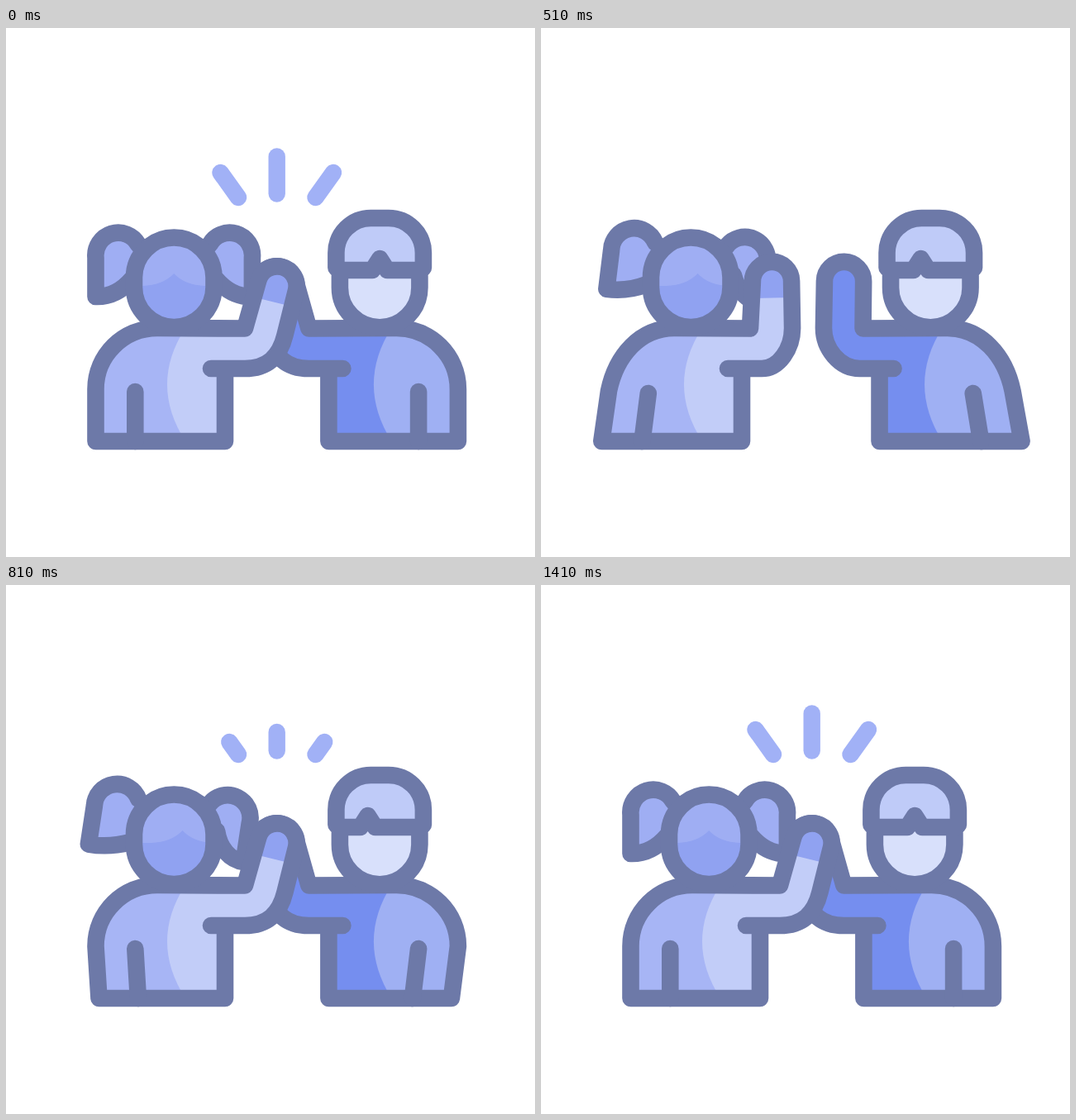
Write an HTML page that moves like this. It is 640 by 640 pixels and loops after 1650 ms.

```html
<!DOCTYPE html>
<html lang="en">
<head>
<meta charset="utf-8">
<title>High five</title>
<style>
  html, body { margin: 0; height: 100%; overflow: hidden; background: #fff; }
  svg { display: block; width: 100vw; height: 100vh; }
  .ink { fill: none; stroke: #6d79a8; stroke-width: 20.6; stroke-linecap: round; stroke-linejoin: round; }
  .ink.hair { fill: #9faef3; }
  .ink.hat { fill: #bfcbf8; }
  .spark { stroke: #a1b1f6; stroke-width: 20.4; stroke-linecap: round; }
</style>
</head>
<body>
<svg viewBox="0 0 640 640">
  <clipPath id="face"><rect x="155" y="253.5" width="96.5" height="108.5" rx="48.2"/></clipPath>
  <g id="sparks"></g>

  <g id="boy">
    <path class="shirt" fill="#758eef"/>
    <path class="side" fill="#9fb0f3"/>
    <path class="outline ink"/>
    <path class="slit ink"/>
    <path d="M155 293V314a48.2 48.2 0 0 0 96.5 0V293Z" fill="#d8e0fb"/>
    <path class="ink" d="M155 300V314a48.2 48.2 0 0 0 96.5 0V300"/>
    <path class="hat ink"/>
  </g>

  <g id="girl">
    <path class="left hair ink"/>
    <g transform="translate(406.4 0) scale(-1 1)"><path class="right hair ink"/></g>
    <path class="shirt" fill="#c2cdf8"/>
    <path class="side" fill="#a7b5f5"/>
    <path class="hand" fill="#90a2f1"/>
    <path class="outline ink"/>
    <path class="slit ink"/>
    <g clip-path="url(#face)">
      <rect x="150" y="250" width="106" height="116" fill="#9faef3"/>
      <path class="fringe" fill="#90a2f1" d="M130 312H165Q190 311 203.2 297Q216 311 241 312H280V370H130Z"/>
    </g>
    <rect class="ink" x="155" y="253.5" width="96.5" height="108.5" rx="48.2"/>
  </g>
</svg>
<script>
const LOOP = 1650, FIRST = 90, LAST = 1410, STEP = 20;
const LEAVE = 80, PEAK = 620, HIT = 780, MIRROR = 655.4;
const set = (sel, name, value) => document.querySelector(sel).setAttribute(name, value);
const ramp = (t, a, b) => Math.min(1, Math.max(0, (t - a) / (b - a)));
const smooth = (u, power = 1) => { u **= power; return u * u * (3 - 2 * u); };
const mix = (a, b, u) => a + (b - a) * u;
const mixPt = (p, q, u) => p.map((v, i) => mix(v, q[i], u));

// Rise and fall between 0 and 1.
const pulse = (t, a, peak, b, power) =>
  smooth(ramp(t, a, peak), power) - smooth(ramp(t, peak, b), power);

// The hem trails outwards, swings past its rest and settles.
const hemAt = (t, out, over) =>
  -out * smooth(ramp(t, LEAVE, PEAK), 1.6)
  + (out + over) * smooth(ramp(t, PEAK, 810))
  - over * smooth(ramp(t, 810, 1300));

function drawBody(id, { k, hem, reach, bend, edge, bulge }) {
  const tilt = mix(14, -1, k) * Math.PI / 180, cos = Math.cos(tilt), sin = Math.sin(tilt);
  const palmX = 328 - reach * k, palmY = mix(312, 306.5, k);
  // Point on the arm: across and down from the palm centre.
  const arm = (x, y) => [palmX + x * cos - y * sin, palmY + x * sin + y * cos];
  const R = 23.6, fore = arm(R, 56), sway = 4.5 * k;
  const shoulder = `H${108.5 + hem}L${108.5 - sway} ${437 + 2 * k}`
    + `C${108.5 + sway} 396 142 363 183 363`;
  const palm = `L${arm(-R, 0)}A${R} ${R} 0 0 1 ${arm(R, 0)}`;
  const body = `M265 412V500${shoulder}L${289 - bend * k} 363.5${palm}L${fore}`
    + `C${fore[0] - 26 * sin} ${fore[1] + 26} ${mix(289, fore[0], .55)} 412 289 412`;
  const part = (name, d) => set(`#${id} .${name}`, 'd', d);
  part('shirt', body + 'Z');
  part('outline', body + 'H248');
  part('side', `M${edge} 500${shoulder}H${edge}Q${bulge} 431 ${edge} 500Z`);
  part('slit', `M${156.3 - sway} ${440 + 2 * k}L${156.3 + .9 * hem} 500`);
  if (id === 'girl') part('hand', `M${arm(-R, 20)}${palm}L${arm(R, 20)}Z`);
}

function drawTail(name, swing) {
  set(name, 'd', 'M160 262A27.5 27.5 0 0 0 108.5 278V325'
    + `C125 325.5 140 ${318 + 5 * swing} ${152 + 6 * swing} ${304 + 12 * swing}`);
  set(name, 'transform', `rotate(${9.2 * swing} 180 262)`);
}

// Each spark: tail, head at rest, far end when flying off.
const sparks = [
  [[281, 205], [259.5, 175], [254.5, 164]],
  [[327.7, 200.5], [327.7, 155.5], [327.7, 141.5]],
  [[374.5, 205], [396, 175], [404, 164]]
].map(pts => {
  const el = document.createElementNS('http://www.w3.org/2000/svg', 'path');
  el.setAttribute('class', 'spark');
  document.querySelector('#sparks').append(el);
  return { el, pts };
});

function drawSparks(t) {
  const back = t > 750;
  const fly = ramp(t, LEAVE, 250), chase = ramp(t, LEAVE, 320) ** 1.25, grow = smooth(ramp(t, 750, 870));
  set('#sparks', 'opacity', back ? 1 : 1 - ramp(t, 215, 350));
  for (const { el, pts: [tail, head, far] } of sparks) {
    const from = back ? tail : mixPt(tail, far, chase);
    const to = back ? mixPt(tail, head, grow) : mixPt(head, far, fly);
    el.setAttribute('d', `M${from}L${to}`);
  }
}

function draw(t) {
  const apart = 26 * pulse(t, LEAVE, PEAK, HIT, 1.25), k = apart / 22;
  const lag = pulse(t, LEAVE, 710, 1370, 1);
  const notch = 203.2 + 15.5 * lag;
  set('#girl', 'transform', `translate(${-apart} 0)`);
  set('#boy', 'transform', `translate(${MIRROR + .87 * apart} 0) scale(-1 1)`);
  drawBody('girl', { k, hem: hemAt(t, 17, 4), reach: 26.5, bend: 14, edge: 217, bulge: 173 });
  drawBody('boy', { k, hem: hemAt(t, 20, 8), reach: 20, bend: 4, edge: 189, bulge: 232 });
  drawTail('.left', lag);
  drawTail('.right', -lag);
  set('.fringe', 'transform', `translate(${11 * lag} 0)`);
  set('.hat', 'd', 'M150.5 290V272A42 42 0 0 1 192.5 230H214A42 42 0 0 1 256 272V290L253 293'
    + `H${notch + 9}L${notch} 279L${notch - 9} 293H153.5Z`);
  drawSparks(t);
}

function tick(now) {
  const t = now % LOOP;
  draw(t < FIRST ? 0 : Math.min(LAST, FIRST + Math.floor((t - FIRST) / STEP) * STEP));
  requestAnimationFrame(tick);
}
draw(0);
requestAnimationFrame(tick);
</script>
</body>
</html>
```
